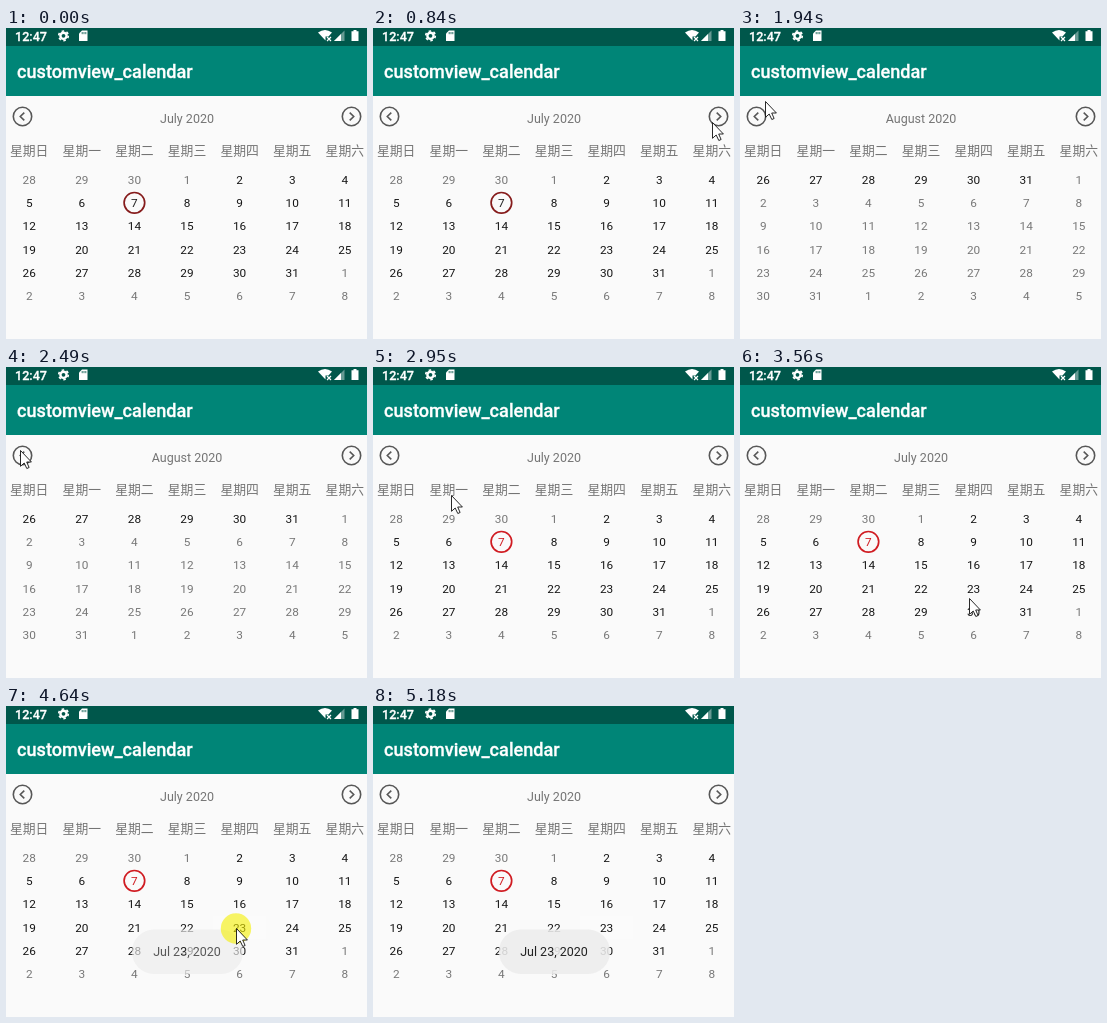
Animation of 361 by 311 pixels, one loop 6.34 s. Source, as an HTML page:

```html
<!DOCTYPE html>
<html lang="en">
<head>
<meta charset="utf-8">
<title>customview_calendar</title>
<style>
  html, body { margin: 0; width: 100%; height: 100%; overflow: hidden; background: #fafafa; }
  svg { display: block; width: 361px; height: 311px; font: 12.5px Roboto, sans-serif; }
  .mid { text-anchor: middle; }
  .week { font: 12.8px "Noto Sans CJK SC", "Noto Sans CJK", sans-serif; fill: #747474; }
  .day { font-size: 11.8px; }
  .month { fill: #757575; }
  .strong { font-weight: 500; stroke: #fff; stroke-width: .3; }
  #august, #glow, #press, #toast { opacity: 0; }
  #today { fill: none; stroke-width: 1.7; }
</style>
</head>
<body>
<svg viewBox="0 0 361 311">
  <defs>
    <g id="button" fill="none" stroke="#575757" stroke-width="1.6">
      <circle r="9.2"/>
      <path d="M1.8 -3.8L-2.2 0L1.8 3.8"/>
    </g>
  </defs>

  <rect width="361" height="311" fill="#fafafa"/>
  <rect width="361" height="68" fill="#008577"/>
  <rect width="361" height="18" fill="#00574b"/>

  <g fill="#fff">
    <text class="strong" x="9" y="12.5" font-size="12.6">12:47</text>
    <circle cx="57.5" cy="7.8" r="3.1" fill="none" stroke="#fff" stroke-width="2.4"/>
    <circle cx="57.5" cy="7.8" r="4.8" fill="none" stroke="#fff" stroke-width="1.6" stroke-dasharray="2.5 2.53"/>
    <path d="M73 5.5L76 2.5H81.5V13H73Z"/>
    <path d="M76.2 4V6.2M78 4V6.2M79.8 4V6.2" stroke="#00574b" stroke-width=".8"/>
    <path d="M312 4.5Q319 -.5 326 4.5L322.5 8.5H319.5V12.5Z"/>
    <path d="M321 9L325 13M325 9L321 13" stroke="#fff" stroke-width="1.2"/>
    <path d="M328 13H338.5V2.5Z" opacity=".4"/>
    <path d="M328 13H335V6Z"/>
    <path d="M345.5 3.2H347.5V2H350.5V3.2H352.5V13H345.5Z"/>
    <text class="strong" x="11" y="50" font-size="18.1">customview_calendar</text>
  </g>

  <use href="#button" x="16.5" y="88.5"/>
  <use href="#button" transform="translate(345.5 88.5) scale(-1 1)"/>
  <g id="weekdays"></g>
  <rect id="press" x="207" y="210" width="53" height="23" fill="#fbfbfb"/>
  <g id="july"></g>
  <g id="august"></g>

  <g id="toast">
    <rect x="126" y="223.5" width="111" height="44.5" rx="22" fill="#ececec" opacity=".88"/>
    <text class="mid" x="181" y="250.3" fill="#222">Jul 23, 2020</text>
  </g>
  <g id="pointer">
    <circle id="glow" cy=".5" r="15.2" fill="#f5f000" fill-opacity=".6"/>
    <path d="M.5 .5V16.3L4.2 13L6.8 18.5L9.1 17.5L6.7 12H11.4Z" fill="#fff" stroke="#111" stroke-width=".9"/>
  </g>
</svg>

<script>
const LOOP = 6340;
const $ = id => document.getElementById(id);
const columnX = i => 23.2 + 52.6 * i;
const rowY = i => 151.8 + 23.2 * i;

function add(parent, tag, attrs, text = '') {
  const el = document.createElementNS('http://www.w3.org/2000/svg', tag);
  for (const name in attrs) el.setAttribute(name, attrs[name]);
  el.textContent = text;
  parent.append(el);
  return el;
}

// Dark days lie strictly between the first of July and the first of August.
function drawMonth(group, title, month, firstDay) {
  add(group, 'text', { class: 'mid month', x: 181, y: 95.4 }, title);
  for (let i = 0; i < 42; i++) {
    const date = new Date(2020, month, firstDay + i);
    const isDark = date > new Date(2020, 6, 1) && date < new Date(2020, 7, 1);
    const label = add(group, 'text', {
      class: 'mid day', x: columnX(i % 7), y: rowY(Math.floor(i / 7)) + 4.2,
      fill: isDark ? '#161616' : '#777'
    }, date.getDate());
    if (isDark && date.getDate() === 7) label.id = 'todayLabel';
  }
}

[...'日一二三四五六'].forEach((day, i) =>
  add($('weekdays'), 'text', { class: 'mid week', x: columnX(i), y: 126.8 }, '星期' + day));
drawMonth($('july'), 'July 2020', 5, 28);
drawMonth($('august'), 'August 2020', 6, 26);
add($('july'), 'circle', { id: 'today', cx: columnX(2), cy: rowY(1) - .2, r: 10.3, stroke: '#861c1c' });

// Each step is [ms, value] and holds until the next one.
function play(id, property, steps) {
  const frames = steps.map(([ms, value]) =>
    ({ offset: ms / LOOP, [property]: value, easing: 'step-end' }));
  frames.push({ offset: 1, [property]: steps[steps.length - 1][1] });
  $(id).animate(frames, { duration: LOOP, iterations: Infinity });
}

const at = (x, y) => `translate(${x}px, ${y}px)`;

// Eased quadratic curve in discrete steps, on whole hundredths of a second.
function sweep(start, end, count, [x0, y0], [x1, y1], [x2, y2]) {
  return Array.from({ length: count }, (_, k) => {
    const p = k / (count - 1), t = p * p * (3 - 2 * p);
    const bend = (a, b, c) => Math.round((1 - t) ** 2 * a + 2 * t * (1 - t) * b + t * t * c);
    const ms = Math.floor((start + (end - start) * p) / 10) * 10;
    return [ms, at(bend(x0, x1, x2), bend(y0, y1, y2))];
  });
}

play('pointer', 'transform', [
  [0, at(304, 330)],
  ...sweep(70, 690, 9, [304, 291], [316, 190], [331, 94]),
  [770, at(336, 94)], [840, at(339, 94)], [1010, at(341, 94)], [1080, at(343, 94)],
  ...sweep(1400, 2010, 9, [341, 94], [160, 34], [12, 76]),
  [2090, at(14, 83)],
  ...sweep(2790, 3180, 6, [20, 87], [100, 146], [192, 203]),
  ...sweep(3330, 3720, 6, [197, 210], [236, 246], [230, 222]),
  ...sweep(4790, 5100, 5, [233, 226], [268, 264], [315, 303]),
  [5180, at(330, 330)]
]);
play('glow', 'opacity', [[0, 0], [1080, 1], [1250, 0], [2320, 1], [2490, 0], [3720, 1], [4790, 0]]);
play('july', 'opacity', [[0, 1], [1400, 0], [2560, 1]]);
play('august', 'opacity', [[0, 0], [1400, 1], [2560, 0]]);
play('today', 'stroke', [[0, '#861c1c'], [2560, '#d01c22']]);
play('todayLabel', 'fill', [[0, '#222'], [2560, '#d01c22']]);
play('press', 'opacity', [[0, 0], [3950, .5], [4020, 1]]);
play('toast', 'opacity', [[0, 0], [4410, .15], [4490, .35], [4560, .55], [4640, .75], [4790, 1]]);
</script>
</body>
</html>
```
